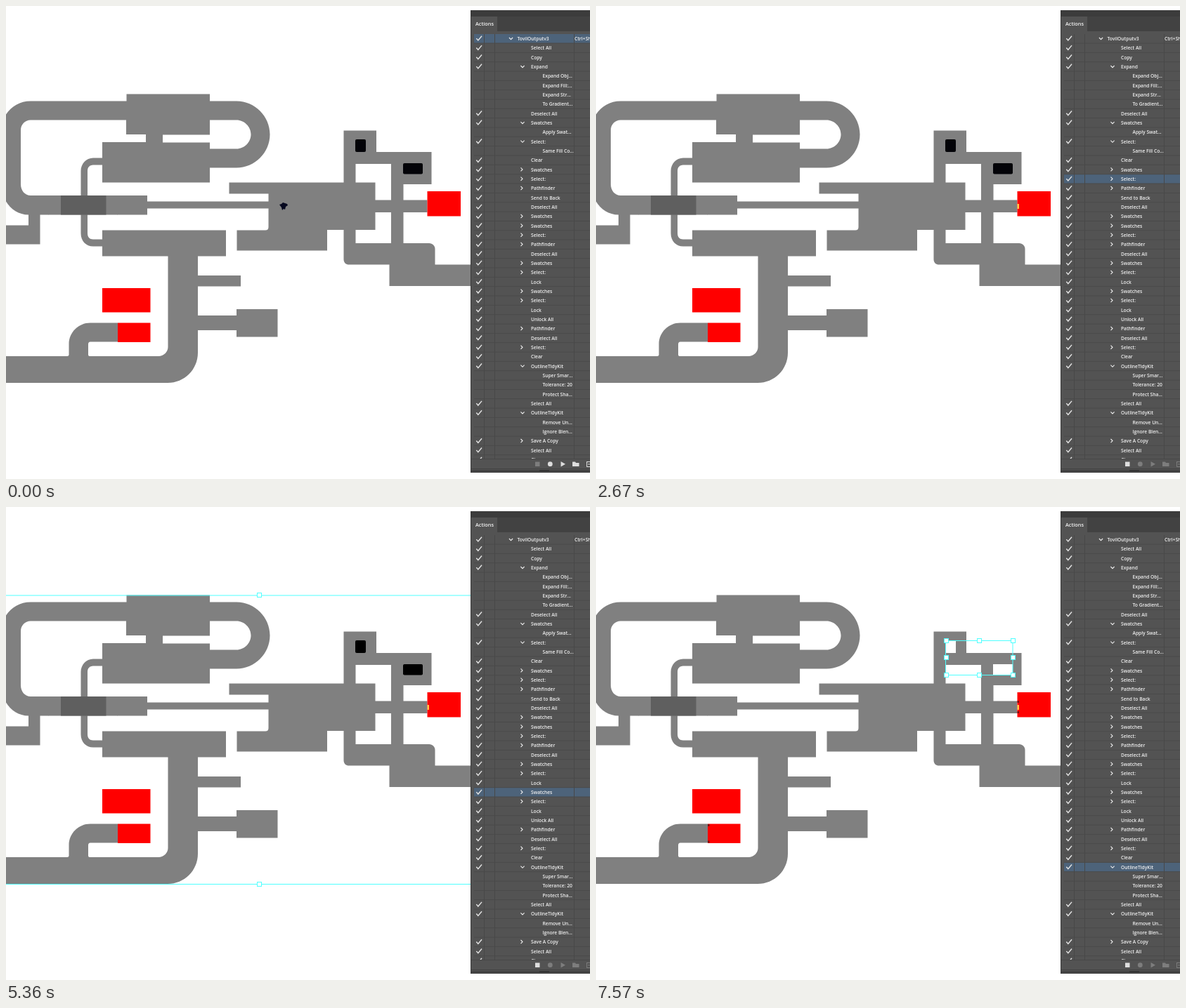
These frames come from a looping animation (831 by 674 pixels, 8 s). An HTML page with a canvas:

```html
<!DOCTYPE html>
<html lang="en">
<head>
<meta charset="utf-8">
<title>Actions playback</title>
<style>
html, body { margin: 0; width: 100%; height: 100%; overflow: hidden; background: #fff; }
canvas { display: block; }
</style>
</head>
<body>
<canvas id="stage" width="831" height="674"></canvas>
<script>
const ctx = document.getElementById('stage').getContext('2d');
const LOOP = 8000, CYAN = '#4fffff', GRAY = '#808080', RED = '#ff0000';
const TOP = 46.4, PITCH = 13.335;

const box = (x, y, x2, y2) => `M${x} ${y}H${x2}V${y2}H${x}Z`;

// Joined floor plan, west part
const WEST =
  'M61 270H35C27 270 21 263 21 254V177C21 169 27 162.5 35 162.5H171V183H199V194H137' +
  'V216.5H124C114 216.5 106.5 225 106.5 235V324C106.5 335 114 342.5 124 342.5H137V356.5H230.5' +
  'V486C230.5 493 224 499 217 499H119Q117 499 117 497V482Q117 478.5 120 478.5H159V451.5H120' +
  'C103 451.5 89.5 465 89.5 482V497Q89.5 499 87 499H-9V537H230C254 537 273 518 273 494' +
  'V462H328V471.5H386.5V432H328V441H273V399.5H334V384H273V356.5H313V319.5H137';
const WEST_BACK =
  'V332.5H124C119 332.5 116 329 116 324V235C116 230 119 226.5 124 226.5H137V251.5H290V230.5H328' +
  'C354 230.5 375.5 209 375.5 183C375.5 157 354 135.5 328 135.5H290V125.5H171.5V135.5H35' +
  'C12 135.5 -6.5 154 -6.5 177V254C-6.5 278 10 297 32 297.5V312.5H-9V339.5H48.5V297.5H61Z' +
  'M290 162.5H328C339 162.5 348.5 172 348.5 183C348.5 194 339 203.5 328 203.5H290V194.5H223V183.5H290Z';
// East part
const EAST =
  'M158.5 270H201V278.5H373.5V267.5H317.5V251.5H480.5V208V190V177.5H527V190V208H565H593H605.5' +
  'V254H565.5V276.5H599.5V294H565.5V338H602C607 338 610.5 342 610.5 346V368.5H845V399H545.5V368.5' +
  'H488C484 368.5 480.5 366 480.5 361V338V319H457V348.5H328.5V319.5H369Q373.5 319.5 373.5 315V288.5H201V297.5H158.5Z' +
  'M497.5 225H548V276.5H525.5V251.5H497.5ZM497.5 319H525.5V294H548V338H497.5Z';
const PLAN = WEST + WEST_BACK + EAST;

const REDS = [[137, 402, 205.5, 436.5], [159, 451.5, 205.5, 479], [599.5, 264, 647, 299.5]];
const BLACKS = [[497, 190, 512, 208], [565, 224, 593, 239.5]];
const rounded = ([x, y, u, v], r) =>
  `M${x + r} ${y}H${u - r}Q${u} ${y} ${u} ${y + r}V${v - r}Q${u} ${v} ${u - r} ${v}` +
  `H${x + r}Q${x} ${v} ${x} ${v - r}V${y + r}Q${x} ${y} ${x + r} ${y}Z`;
const BLACK_SEL = BLACKS.map(b => rounded(b, 3.5)).join('');
const RED_SEL = REDS.map(r => box(...r)).join('');
const BIRD_SEL = box(390, 281, 400, 290);

// Separate parts before they are expanded
const LINES =
  'M172 149.5H35C20 149.5 7.5 162 7.5 177V254C7.5 270 20 283.5 40 283.5H61H78H142H158H201H373' +
  'M273 149.5H328C347 149.5 362 164 362 183C362 202 347 216.5 328 216.5H287' +
  'M40.5 285V339H48.5V312H0M525.5 285.5H599M488.5 307V345' +
  'M137 216.5H124C114 216.5 106.5 225 106.5 235V324C106.5 335 114 342.5 124 342.5H137' +
  'M137 226.5H124C119 226.5 116 230 116 235V324C116 329 119 332.5 124 332.5H137';
const TRUNK =
  'M230.5 356.5V486C230.5 493 224 499 217 499H117V482Q117 478.5 120 478.5H159V451.5H120' +
  'C103 451.5 89.5 465 89.5 482V499H0M0 537H230C254 537 273 518 273 494V462V441V399V384V356.5';
const ROOMS = [
  [171.5, 125.5, 290.5, 183.5], [199.5, 174, 223, 197], [137.5, 194.5, 290.5, 251.5],
  [137.5, 319.5, 312.5, 356.5], [273, 384, 334, 399.5], [272, 441.5, 328, 462],
  [328.5, 432, 386.5, 471.5], [317.5, 251.5, 375, 267.5], [373.5, 251.5, 525.5, 319],
  [373.5, 304.5, 457, 319.5], [328.5, 319.5, 457, 348.5], [545.5, 368.5, 845, 399]
];
const NORTH_EAST =
  'M480.5 261V208V190V177.5H527V190V208H565H593H605.5V254H565.5V338H548.5V225H497.5V261Z' +
  'M488 368.5C484 368.5 480.5 366 480.5 361V338H602Q610.5 338 610.5 346V368.5Z';
const RAW = LINES + TRUNK + NORTH_EAST + ROOMS.map(r => box(...r)).join('') + RED_SEL;
const CENTERS = 'M230 154M210 185M346 259M449 285M303 391M299 451M357 451M171 419' +
  'M181 465M622 281M544 352M655 383M504 199M579 231M395 285';

const PLAN_BOX = [-60, 126, 779, 537.5];
const BLACK_BOX = [497.5, 190.5, 593, 239.5];
const BIRD_BOX = [389, 280, 401, 291];

// time, active row, what is selected, stale bounding box
const STEPS = [
  [0, 0, ''], [870, 1, ''], [930, 2, RAW + BLACK_SEL + BIRD_SEL + CENTERS],
  [1200, 3, RAW + BLACK_SEL + BIRD_SEL + CENTERS],
  [1400, 8, PLAN + RED_SEL + BLACK_SEL + BIRD_SEL], [1600, 9, '', PLAN_BOX], [1800, 11, ''],
  [2070, 13, BIRD_SEL], [2270, 14, '', BIRD_BOX], [2600, 15, '', BIRD_BOX], [2670, 15, ''],
  [2870, 16, PLAN], [3100, 17, PLAN, PLAN_BOX], [3420, 18, PLAN, PLAN_BOX],
  [3630, 19, '', PLAN_BOX], [3760, 20, '', PLAN_BOX], [3830, 21, ''],
  [4090, 22, BLACK_SEL], [4350, 23, BLACK_SEL, BLACK_BOX], [4680, 24, '', BLACK_BOX], [4890, 25, ''],
  [5150, 26, PLAN], [5360, 27, '', PLAN_BOX], [5630, 28, ''],
  [5900, 29, BLACK_SEL], [6100, 30, '', BLACK_BOX],
  [6440, 31, PLAN + BLACK_SEL], [6700, 32, PLAN + BLACK_SEL, PLAN_BOX],
  [7030, 33, '', PLAN_BOX], [7230, 34, BLACK_SEL], [7500, 35, '', BLACK_BOX]
];

// Prefix: v open, > closed, - plain step, . setting
const ROWS = ('vTovilOutputv3|-Select All|-Copy|vExpand|.Expand Obj...|.Expand Fill:...|.Expand Str...|' +
  '.To Gradient...|-Deselect All|vSwatches|.Apply Swat...|vSelect:|.Same Fill Co...|-Clear|>Swatches|' +
  '>Select:|>Pathfinder|-Send to Back|-Deselect All|>Swatches|>Swatches|>Select:|>Pathfinder|' +
  '-Deselect All|>Swatches|>Select:|-Lock|>Swatches|>Select:|-Lock|-Unlock All|>Pathfinder|' +
  '-Deselect All|>Select:|-Clear|vOutlineTidyKit|.Super Smar...|.Tolerance: 20|.Protect Sha...|' +
  '-Select All|vOutlineTidyKit|.Remove Un...|.Ignore Blen...|>Save A Copy|-Select All|-Clear').split('|');

function rect(color, x, y, x2, y2) {
  ctx.fillStyle = color;
  ctx.fillRect(x, y, x2 - x, y2 - y);
}

function poly(color, width, ...pts) {
  ctx.strokeStyle = color;
  ctx.lineWidth = width;
  ctx.beginPath();
  pts.forEach(([x, y]) => ctx.lineTo(x, y));
  ctx.stroke();
}

function fillPath(color, d) {
  ctx.fillStyle = color;
  ctx.fill(new Path2D(d), 'evenodd');
}

// End points of every path command
function anchors(d) {
  const out = [];
  let x = 0, y = 0;
  for (const [, cmd, args] of d.matchAll(/([MHVCQ])([^A-Z]*)/g)) {
    const n = args.trim().split(/\s+/).map(Number);
    if (cmd === 'H') x = n[0];
    else if (cmd === 'V') y = n[0];
    else [x, y] = n.slice(-2);
    out.push([x, y]);
  }
  return out;
}

function drawSelection(d) {
  ctx.strokeStyle = CYAN;
  ctx.lineWidth = 1;
  ctx.stroke(new Path2D(d));
  ctx.fillStyle = CYAN;
  const centers = new Set(anchors(CENTERS).map(String));
  for (const p of anchors(d)) {
    const s = centers.has(String(p)) ? 4 : 6;
    ctx.fillRect(Math.round(p[0] - s / 2), Math.round(p[1] - s / 2), s, s);
  }
}

function drawBounds([x, y, x2, y2]) {
  ctx.strokeStyle = CYAN;
  ctx.lineWidth = 1;
  ctx.strokeRect(x, y, x2 - x, y2 - y);
  const mx = (x + x2) / 2, my = (y + y2) / 2;
  ctx.fillStyle = '#fff';
  for (const px of [x, mx, x2]) for (const py of [y, my, y2]) {
    if (px === mx && py === my) continue;
    const hx = Math.round(px) - 2.5, hy = Math.round(py) - 3.5;
    ctx.fillRect(hx, hy, 6, 6);
    ctx.strokeRect(hx, hy, 6, 6);
  }
}

function drawPlan(t) {
  const merged = t >= 3100 && t < 3420;
  fillPath(GRAY, PLAN);
  rect(GRAY, 60.5, 270, 159, 297.5);
  rect('#5f5f5f', 78, 270, 142.5, 297.5);
  REDS.forEach(r => rect(RED, ...r));
  if (merged) rect(GRAY, 106.5, 270, 116, 297.5);
  else if (t < 7500) BLACKS.forEach(b => fillPath(t < 3420 ? '#030308' : '#000', rounded(b, 2)));
  else BLACKS.forEach(b => rect('#fff', ...b));
  if (t >= 1400) rect('#ffc84a', 599.5, 282, 602, 289);
  if (t >= 6700) {
    for (const [x, y] of [[159, 452], [159, 475.5], [599.5, 276], [599.5, 291]]) rect('#7a1010', x, y, x + 2.5, y + 3);
  }
  if (t < 2270) fillPath('#06081f', 'M389 283L392 282L394 280L397 281L400 282L401 284L398 286L397 290L395 289L393 291L392 287Z');
}

function drawRow(row, i) {
  const y = TOP + i * PITCH, kind = row[0], color = '#f0f0f0';
  poly('#4a4a4a', 1, [666, y + 6.6], [831, y + 6.6]);
  if (kind !== '.') poly('#e4e4e4', 1.4, [669.3, y - .3], [671.8, y + 2.6], [677, y - 3.6]);
  const cx = i ? 735 : 718.5;
  if (kind === 'v') poly(color, 1.1, [cx - 2.6, y - 1.4], [cx, y + 1.2], [cx + 2.6, y - 1.4]);
  if (kind === '>') poly(color, 1.1, [732.5, y - 2.8], [735, y - .2], [732.5, y + 2.4]);
  ctx.fillStyle = color;
  ctx.fillText(row.slice(1), !i ? 727.5 : kind === '.' ? 763.5 : 747, y + 2.6);
  if (!i) ctx.fillText('Ctrl+Shift+F2', 809, y + 2.6);
}

function drawButtons(running) {
  const off = '#7d7d7d', on = '#dedede', rest = running ? off : on;
  rect(running ? on : off, 753, 649.5, 759.5, 656);
  ctx.fillStyle = rest;
  ctx.beginPath();
  ctx.arc(774.3, 652.7, 3.4, 0, 7);
  ctx.fill();
  fillPath(rest, 'M789.5 649L796 652.7L789.5 656.5Z');
  fillPath(rest, 'M806 649.5H810L811 651H815.5V656H806Z');
  ctx.strokeStyle = rest;
  ctx.lineWidth = 1;
  ctx.strokeRect(826.5, 649.5, 7, 7);
  poly(rest, 1, [828, 652.9], [833, 652.9]);
}

function drawPanel(active, running) {
  rect('#535353', 661, 6, 831, 665);
  rect('#3c3c3c', 661, 6, 831, 15);
  rect('#424242', 661, 15, 831, 36);
  rect('#535353', 662, 15, 699, 37);
  ctx.textBaseline = 'alphabetic';
  ctx.font = '600 7.3px "Open Sans", sans-serif';
  ctx.fillStyle = '#f4f4f4';
  ctx.fillText('Actions', 668, 27.6);

  ctx.save();
  ctx.beginPath();
  ctx.rect(661, 38, 170, 607);
  ctx.clip();
  const y = TOP + active * PITCH;
  rect('#4d637a', 666, y - 6.4, 831, y + 6.6);
  ctx.font = '600 6.7px "Open Sans", sans-serif';
  ROWS.forEach(drawRow);
  for (const x of [680.5, 695.5, 808.5]) poly('#484848', 1, [x, 40], [x, 645]);
  ctx.restore();

  poly('#474747', 1, [661, 645.5], [831, 645.5]);
  drawButtons(running);
  rect('#424242', 661, 659, 831, 665);
  rect('#535353', 661, 660, 831, 661);
  rect('#333333', 759, 661, 773, 663);
  poly('#3a3a3a', 1, [661.5, 6], [661.5, 665]);
}

function draw(t) {
  const [, row, selected, bounds] = STEPS.findLast(s => s[0] <= t);
  rect('#fff', 0, 0, 831, 674);
  drawPlan(t);
  if (selected) drawSelection(selected);
  if (bounds) drawBounds(bounds);
  drawPanel(row, t >= 870);
}

const start = performance.now();
function tick() {
  draw((performance.now() - start) % LOOP);
  requestAnimationFrame(tick);
}
tick();
</script>
</body>
</html>
```
